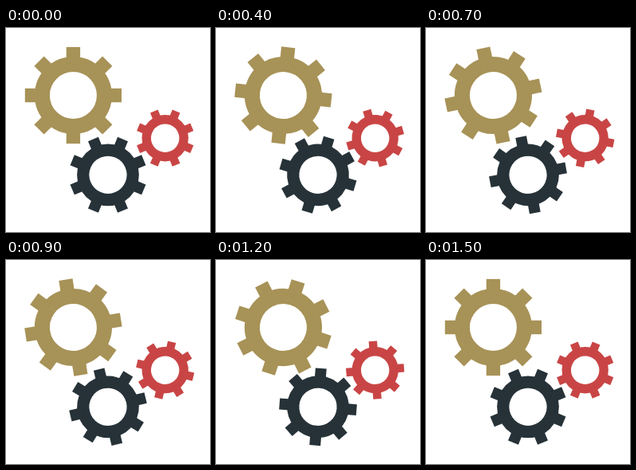
Recreate the animation shown at these times as an HTML page with a canvas. Size 256 px wide and 256 px high, loop 1.6 s.

```html
<!DOCTYPE html>
<html>
<head>
<meta charset="utf-8">
<title>Gears</title>
<style>
html, body { margin: 0; width: 100%; height: 100%; overflow: hidden; background: #fff; }
canvas { display: block; }
</style>
</head>
<body>
<canvas id="stage" width="256" height="256"></canvas>
<script>
const ctx = document.getElementById('stage').getContext('2d');
const STEP = 100, STEPS = 16, TURN = 2 * Math.PI, TEETH = 8;

const gears = [
  { x: 84.4, y: 84.5, size: 1, start: 0, dir: 1, color: '#a79257' },
  { x: 128, y: 184.3, size: 0.8, start: TURN / 16, dir: -1, color: '#263238' },
  { x: 199.7, y: 138.2, size: 0.6, start: TURN / 16, dir: 1, color: '#c94545' }
];

function drawGear({ x, y, size, start, dir, color }, turn) {
  ctx.save();
  ctx.translate(x, y);
  ctx.scale(size, size);
  ctx.rotate(start + dir * turn);
  ctx.strokeStyle = color;
  ctx.lineWidth = 19;
  ctx.beginPath();
  ctx.arc(0, 0, 39, 0, TURN);
  ctx.stroke();
  ctx.fillStyle = color;
  for (let i = 0; i < TEETH; i++) {
    ctx.fillRect(40, -8.7, 20.6, 17.4);
    ctx.rotate(TURN / TEETH);
  }
  ctx.restore();
}

// One full turn takes 15 steps; the closing pose is held for one more.
function draw() {
  const step = Math.floor(performance.now() / STEP) % STEPS;
  ctx.clearRect(0, 0, 256, 256);
  for (const gear of gears) drawGear(gear, step / (STEPS - 1) * TURN);
  requestAnimationFrame(draw);
}
draw();
</script>
</body>
</html>
```
